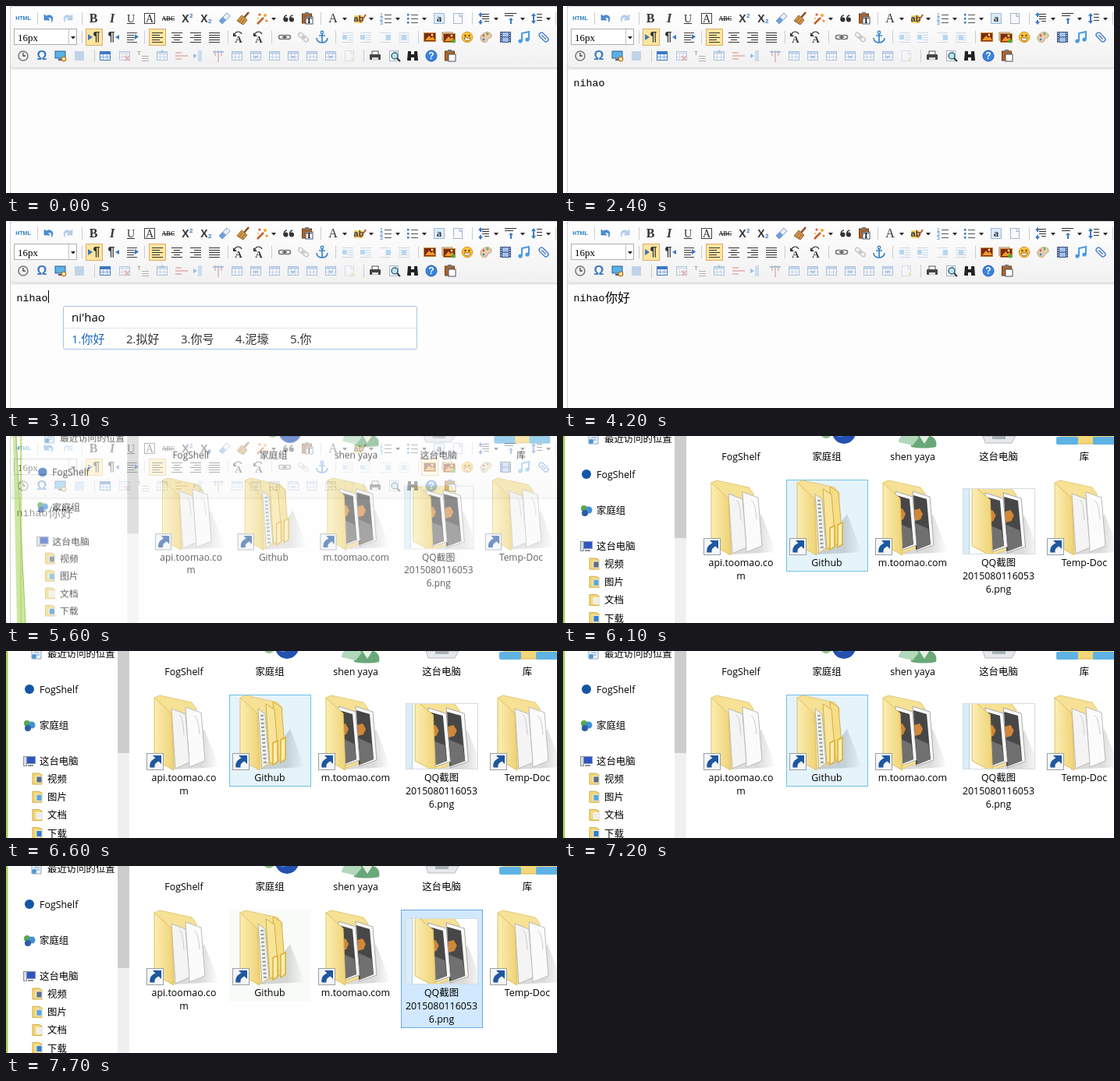
An HTML page for the animation above (8 s loop, 706 px wide and 240 px high).

```html
<!DOCTYPE html>
<html lang="zh">
<head>
<meta charset="utf-8">
<title>Editor and file picker</title>
<style>
html, body { margin: 0; width: 100%; height: 100%; overflow: hidden; background: #fff; }
svg { display: block; }
.serif { font-family: "Liberation Serif", serif; }
.sans { font-family: "Liberation Sans", sans-serif; }
.mono { font: 13.33px "Liberation Mono", "Noto Sans CJK SC", monospace; }
.han { font: 300 16px "Noto Sans CJK SC", "Noto Sans CJK", sans-serif; }
.label { font: 12.4px "Open Sans", "Noto Sans CJK SC", "Noto Sans CJK", sans-serif; }
#win { transform-origin: 0 0; }
</style>
</head>
<body>
<svg id="stage" width="706" height="240" viewBox="0 0 706 240" xmlns="http://www.w3.org/2000/svg"></svg>
<script>
const LOOP = 8000;
const rules = [];

// Hard-stepped keyframes from [ms, value] pairs
function track(id, prop, ...points) {
  const frames = points.map(([ms, v]) => `${ms / LOOP * 100}%{${prop}:${v}}`).join('');
  rules.push({ id, name: `${id}-${prop}`, frames });
}
function show(id, ...spans) {
  const points = [[0, 0]];
  for (const [on, off] of spans) {
    points.push([on, 1]);
    if (off) points.push([off, 0]);
  }
  track(id, 'opacity', ...points);
}

// Drawing helpers
const rect = (x, y, w, h, fill, more = '') => `<rect x="${x}" y="${y}" width="${w}" height="${h}" fill="${fill}" ${more}/>`;
const path = (d, fill, more = '') => `<path d="${d}" fill="${fill}" ${more}/>`;
const line = (d, color, w = 1, more = '') => path(d, 'none', `stroke="${color}" stroke-width="${w}" ${more}`);
const dot = (x, y, r, fill, more = '') => `<circle cx="${x}" cy="${y}" r="${r}" fill="${fill}" ${more}/>`;
const text = (x, y, s, cls, more = '') => `<text x="${x}" y="${y}" class="${cls}" ${more}>${s}</text>`;
const at = (x, y, art, opacity = 1) => `<g transform="translate(${x} ${y})" opacity="${opacity}">${art}</g>`;
const glyph = (s, size, more = '', cls = 'serif') => text(0, size * 0.34, s, cls, `font-size="${size}" text-anchor="middle" fill="#333" ${more}`);
const bars = (widths, align = 0, color = '#333', step = 3) => widths.map((w, i) =>
  rect(-7 + (14 - w) * align, -6 + i * step, w, 1, color)).join('');
const drop = (x, y) => path(`M${x - 3} ${y - 1}h6l-3 3.5z`, '#222');
const frame = (x, y, fill, stroke) => rect(x - 10.5, y - 10.5, 21, 21, fill, `stroke="${stroke}"`);

const BLUE = '#3d78c4';
const ink = '#333';

const list = mark => [-5, 0, 5].map((y, i) => mark(y, i) + rect(-2, y, 9, 1, '#555')).join('');
const page = rect(-5.5, -6.5, 11, 13, '#f7f9fd', 'stroke="#a9b4c8"') + path('M2 -6.5v4h4', '#dce4f2', 'stroke="#a9b4c8"');
const clipboard = rect(-6.5, -6, 12, 12, '#a9642c', 'stroke="#6d3d18"') + rect(-3, -8, 5, 3, '#777') + rect(-2, -2, 9, 9, '#fff', 'stroke="#456"');
const picture = rect(-7.5, -5.5, 15, 11, '#7a2b12', 'stroke="#c9863c"') + path('M-6 4L-1 -2L2 1L4 -1L7 4z', '#f39a2c') + dot(3, -3, 1.5, '#ffe08a');
const undo = path('M-6 -5v7h7l-2.5-2.5c3-2 6 0 5 5c4-6-1-11-7-7.5z', '#4b8fdb', 'stroke="#2a68b0" stroke-width=".6"');
const floated = (x, w) => bars([14, w, w, w, 14], 1, '#8fb4d8') + rect(x, -3, 6, 6, '#6aaee8');
const link = x => rect(x, -2.5, 8, 5, 'none', 'rx="2.5" stroke="#777" stroke-width="1.6"');
const chain = link(-7.5) + link(-.5) + line('M-3 0h6', '#555', 1.5);
const grid = head => rect(-6.5, -5.5, 13, 11, '#fff', `stroke="${BLUE}"`) + rect(-6, -5, 12, 3, head) +
  line('M-6 1.5h12M-2.5 -2v7M2.5 -2v7', '#86aadc');
const pilcrow = flip => glyph('¶', 16, `font-weight="bold" dx="${flip ? -3 : 3}"`, 'sans') +
  (flip ? path('M7 -3v6l-5-3z', BLUE) : path('M-8 -4v8l6-4z', BLUE));
const turn = s => glyph(s, 13, 'dy="3" font-weight="bold"') + line('M-5 -4c2-4 7-4 9 0', ink, 1.2) + path('M-7 -6v5h5z', ink);
const script = y => glyph('X', 14, 'font-weight="bold" dx="-2"', 'sans') + text(3, y, '2', 'sans', `font-size="8" font-weight="bold" fill="${BLUE}"`);

function toolbar() {
  const seps = [[16, 40, 97, 403, 597, 704], [40, 97, 177, 284, 340, 422, 528], [64, 113, 458]];
  let out = seps.map(([y, ...xs]) => xs.map(x => rect(x, y - 8, 1, 16, '#ccc')).join('')).join('');

  const row1 = [
    [22, glyph('HTML', 7, 'font-weight="bold" style="fill:#2b7fc3"', 'sans')],
    [55, undo], [79, `<g transform="scale(-1 1)">${undo}</g>`, .4],
    [112, glyph('B', 16, 'font-weight="bold"')],
    [136, glyph('I', 16, 'font-style="italic" font-weight="bold"')],
    [160, glyph('U', 14) + rect(-5, 6, 10, 1, ink)],
    [184, rect(-6.5, -6.5, 13, 13, '#fff', 'stroke="#444"') + glyph('A', 14)],
    [208, glyph('ABC', 8, 'font-weight="bold"') + rect(-8, 0, 16, 1, ink)],
    [232, script(-1)], [256, script(6)],
    [280, path('M-7 3L3 -7L7 -3L-3 7z', '#e9f0fa', 'stroke="#7f98bd"') + path('M-7 3L-2 -2L2 2L-3 7z', '#6f9fdc')],
    [304, line('M7 -8L1 -1', '#8a4b1c', 2.5) + path('M-2 -4L5 2L0 8L-8 3z', '#d59a4e', 'stroke="#8a5a24"') + line('M-5 4l4-5M-2 6l4-5', '#8a5a24')],
    [328, line('M-6 7L2 -1', '#c0602a', 2.5) + dot(4, -4, 2, '#f6a623') + dot(-3, -5, 1.6, '#e8542c') + dot(6, 3, 1.6, '#f08a24') + dot(-5, 0, 1, '#f6a623')],
    [362, dot(-3.5, 1.5, 3, ink) + dot(4, 1.5, 3, ink) + line('M-6 2c0-4 2-6 4-6M1.5 2c0-4 2-6 4-6', ink, 1.5)],
    [386, clipboard + text(-1, 6, 'T', 'serif', 'font-size="10" font-weight="bold"')],
    [419, glyph('A', 16)],
    [453, rect(-7, -4, 11, 10, '#f9d36a') + glyph('ab', 11, 'font-weight="bold" dx="-1"', 'sans') + line('M1 5L8 -5', '#b5562b', 2)],
    [487, list((y, i) => text(-8, y + 3, i + 1, 'sans', `font-size="7" fill="${BLUE}"`))],
    [521, list(y => rect(-7, y - 1, 2.5, 2.5, BLUE))],
    [555, rect(-6.5, -6.5, 13, 13, '#dcecfb', 'stroke="#6a9bd0" stroke-dasharray="2 1"') + glyph('a', 13, 'font-weight="bold"')],
    [579, page],
    [612, path('M-7 -4l3-4l3 4h-2v2h-2v-2zM-7 4l3 4l3-4h-2v-2h-2v2z', BLUE) + bars([9, 9, 9, 6], 1)],
    [647, rect(-8, -7, 15, 1, ink) + rect(-8, -4, 11, 1, ink) + path('M-3 2l3-3l3 3h-2v5h-2v-5z', BLUE)],
    [680, path('M-7 -3l3-4l3 4h-2v6h2l-3 4l-3-4h2v-6z', BLUE) + bars([7, 7, 7], 1, ink, 4)],
  ];
  const row2 = [
    [113, pilcrow(false)], [138, pilcrow(true)],
    [162, bars([13, 9, 13, 9, 13], 0, '#444') + path('M3 -4v7l5-3.5z', BLUE)],
    [194, bars([14, 10, 14, 10, 14])], [219, bars([14, 8, 14, 8, 14], .5)],
    [243, bars([14, 9, 14, 9, 14], 1)], [267, bars([14, 14, 14, 14, 14])],
    [298, turn('A')], [324, turn('A')],
    [357, chain], [381, `<g transform="rotate(40)">${chain}</g>`, .35],
    [405, dot(0, -6, 1.7, 'none', 'stroke="#3a84c8" stroke-width="1.4"') + line('M0 -4V7M-4 -2h8M-7 1c0 8 14 8 14 0', '#3a84c8', 1.7)],
    [438, floated(-7, 7), .45], [461, floated(-7, 7), .45], [486, floated(1, 7), .45], [510, floated(-3, 14), .45],
    [543, picture], [567, rect(-8, -6, 13, 10, '#fff', 'stroke="#a87b45"') + at(1, 1, picture) + dot(6, 5, 2.5, '#54ad3c')],
    [591, dot(0, 0, 6.8, '#fbc63b', 'stroke="#d98e20"') + dot(-2.5, -2, 1.2, '#653b10') + dot(2.5, -2, 1.2, '#653b10') + path('M-4 1h8c-1 5-7 5-8 0', '#fff', 'stroke="#7d4610" stroke-width=".8"')],
    [615, path('M-7 2C-8 -5 4 -10 7 -3C8 2 2 1 2 3C2 8 -6 8 -7 2z', '#e4cfae', 'stroke="#b59a74"') + dot(-3, -2, 1.4, '#d9534f') + dot(2, -4, 1.4, '#5aa65a') + dot(-3, 3, 1.4, '#4c7fc9')],
    [640, rect(-7, -7, 14, 14, '#394f7c') + rect(-4, -6, 8, 5.5, '#9fc0ef') + rect(-4, .5, 8, 5.5, '#9fc0ef') + line('M-5.5 -6v13M5.5 -6v13', '#fff', 1, 'stroke-dasharray="1.5"')],
    [664, line('M-3 5V-5L6 -7V3', '#4a9be0', 2) + dot(-5, 5, 2.6, '#4a9be0') + dot(4, 3, 2.6, '#4a9be0')],
    [689, `<g transform="rotate(-45)">${rect(-3, -7, 6, 14, 'none', 'rx="3" stroke="#4f82cf" stroke-width="1.5"')}${line('M0 -4V4', '#4f82cf', 1.5)}</g>`],
  ];
  const row3 = [
    [22, dot(0, 0, 6, '#eee', 'stroke="#777" stroke-width="1.5"') + line('M0 -4V0H3', '#444', 1.3)],
    [46, glyph('Ω', 16, `font-weight="bold" style="fill:${BLUE}"`, 'sans')],
    [70, rect(-7, -6, 13, 9, '#58b1e8', 'stroke="#33638f"') + rect(-3, 4, 5, 2, '#557') + dot(4, 4, 3, '#f2b53c', 'stroke="#a66d1c"') + line('M4 2v4M2 4h4', '#fff')],
    [94, rect(-6, -6, 12, 12, '#8fb4e0'), .5],
    [127, grid('#3d78c4')],
    [152, grid('#bcd') + line('M0 0l6 6M6 0L0 6', '#d44', 2), .35],
    [176, text(-8, -1, 'T', 'sans', 'font-size="8"') + bars([0, 0, 9, 9, 9], 1, '#666'), .45],
    [200, grid('#9bd') + path('M-3 -4l3-4l3 4z', BLUE), .4],
    [225, line('M-8 -4H0M-8 0H8M-8 4H0', '#d66', 2), .4],
    [248, rect(-2, -7, 5, 14, '#9cc2ec') + path('M-8 -3v6l5-3z', BLUE), .45],
    [272, line('M-4 -7V0M0 -7V8M4 -7V0', '#c77', 2) + line('M-7 -5H7', BLUE, 2), .4],
    ...[296, 320, 344, 368, 392, 416].map((x, i) => [x, rect(-7, -5, 14, 10, '#cfe0f5') + grid('#7ea9de') + (i % 2 ? path('M-3 0h6l-3 4z', BLUE) : ''), .4]),
    [440, page + dot(4, 4, 2, '#e8c65a'), .35],
    [473, rect(-4, -6, 8, 5, '#fff', 'stroke="#555"') + rect(-7, -2, 14, 7, '#444', 'rx="1"') + rect(-4, 2, 8, 4, '#ddd')],
    [497, page + dot(1, 0, 4, '#bfe3ee', 'stroke="#356c78" stroke-width="1.5"') + line('M4 3l4 4', '#333', 2)],
    [521, path('M-6 -6h4v4h4v-4h4l1 12h-5v-4h-4v4h-5z', '#222')],
    [545, dot(0, 0, 7, '#3a83e0', 'stroke="#215cae"') + glyph('?', 12, 'font-weight="bold" style="fill:#fff"', 'sans')],
    [569, clipboard],
  ];

  out += frame(113, 40, '#ffe69f', '#dcac6c') + frame(194, 40, '#ffe69f', '#dcac6c');
  out += [['hoverFace', 591], ['hoverMulti', 567], ['hoverOne', 543]]
    .map(([id, x]) => `<g id="${id}">${frame(x, 40, '#fff5d4', '#dcac6c')}</g>`).join('');
  [[16, row1], [40, row2], [64, row3]].forEach(([y, row]) => {
    out += row.map(([x, art, o]) => at(x, y, art, o)).join('');
  });
  out += [343, 434, 468, 502, 536, 628, 662, 695].map(x => drop(x, 16)).join('');
  out += rect(10.5, 29.5, 80, 20, '#fff', 'stroke="#b0b0b0"') + rect(80, 30, 1, 19, '#c4c4c4') + drop(86, 40) +
    text(15, 45, '16px', 'serif', 'font-size="13"');
  return out;
}

function popup() {
  const words = ['你好', '拟好', '你号', '泥壕', '你'];
  const box = (id, w) => `<g id="${id}">${rect(73.5, 109.5, w, 55, '#fff', 'rx="2" stroke="#a9c3dd"')}${rect(74, 137, w - 1, 1, '#dbe6f0')}</g>`;
  return `<g id="popup">${box('narrow', 361)}${box('wide', 453)}` +
    text(84, 129, "ni'hao", 'label', 'style="font-size:15px"') +
    words.map((s, i) => text(84 + i * 70, 157, `${i + 1}.${s}`, 'label', `style="font-size:15px" fill="${i ? '#333' : '#1c66c0'}"`)).join('') + '</g>';
}

function editor() {
  return rect(0, 0, 706, 240, '#fff') + rect(5.5, -4, 720, 260, '#fdfdfd', 'stroke="#d0d0d0"') +
    rect(5.5, .5, 720, 79, 'url(#bar)', 'rx="4" stroke="#d4d4d4"') + rect(6, 80, 700, 2, '#000', 'opacity=".06"') +
    toolbar() +
    [['ni', 14], ['h', 30], ['ao', 38]].map(([s, x]) => text(x - .5, 103, s, 'mono', `id="type-${s}"`)).join('') +
    text(54, 103.5, '你好', 'han', 'id="word"') +
    rect(0, 89, 1, 16, '#000', 'id="caret"') + popup();
}

// Open folder seen from the side: back, leaning sheets, front cover
const sheet = (x, top, w, fill, stroke) => path(`M${x} ${top}l${w} 7l5 62l${-w} 8z`, fill, `stroke="${stroke}"`);
const photo = x => sheet(x, 71, 22, '#fafafa', '#aaa') + path(`M${x + 1} 76l17 5l5 58l-19 7z`, '#474747') +
  path(`M${x + 4} 112l16 7l3 20l-17 7z`, '#707070') + path(`M${x + 2} 95l7-2l4 7l-3 7l-7 2z`, '#d08738');
const contents = {
  doc: sheet(54, 72, 20, '#fbfbfb', '#bbb') + sheet(36, 74, 18, '#f4f4f4', '#bbb') + line('M46 82c4 2 5 12 6 26M65 83c4 2 6 10 7 24', '#ccc'),
  photo: photo(52) + photo(30),
  dirs: sheet(56, 65, 11, '#f6dd86', '#d2ae4b') + sheet(47, 68, 11, '#f9e59a', '#d2ae4b') + sheet(37, 74, 9, '#f2f2e8', '#b5b5a5') +
    line('M42 82l4 62', '#8d9bab', 4, 'stroke-dasharray="2 3"') +
    path('M56 118l6-3v27l-6 4zM66 114l6-3v28l-6 4z', '#fbeeb4', 'stroke="#dcae33" stroke-width="1.5"'),
};
const folder = kind => path('M40 152L97 149L78 100z', 'url(#shade)') +
  path('M14 60L21 57L62 66L68 74L62 142L36 152z', '#f6e194', 'stroke="#e3c878"') + contents[kind] +
  path('M14 60L36 80L39 153L14 139z', 'url(#cover)', 'stroke="#dfc168"');
const shortcut = rect(4.5, 131.5, 21, 21, '#f4f6f8', 'stroke="#9aa0a6"') +
  path('M12 134h11v11l-3.500-3.500c-5 3-5 4-5 8h-6c-1-6 2-10 7-12z', '#1f579f');

function explorer() {
  const items = [
    [176, 'doc', ['api.toomao.co', 'm']],
    [286, 'dirs', ['Github']],
    [396, 'photo', ['m.toomao.com']],
    [506, null, ['QQ截图', '2015080116053', '6.png']],
    [616, 'doc', ['Temp-Doc']],
  ];
  const hover = (id, x, h, fill = '#e5f3fb', stroke = '#70c0e7') => rect(x + .5, 56.5, 104, h, fill, `stroke="${stroke}" id="${id}"`);
  const middle = (x, y, s) => text(x, y, s, 'label', 'text-anchor="middle"');
  const side = (x, y, s) => text(x, y, s, 'label');
  const thumb = rect(6.5, 67.5, 92, 84, '#fff', 'stroke="#d4dde4"') + rect(7, 68, 8, 83, '#dcedf7') + rect(14, 68, 1, 83, '#a9d4ea') +
    `<g clip-path="url(#thumb)"><g transform="translate(3.500 2) scale(1.050 1)">${folder('photo')}</g></g>`;

  let out = rect(0, 0, 760, 270, '#fff') + rect(0, 0, 2, 270, '#a4cf4c') + rect(2, 0, 1, 270, '#d6e9b0') +
    rect(143, 0, 15, 270, '#f0f0f0') + rect(143, 0, 15, 131, '#cdcdcd');

  // Navigation pane
  out += path('M33 -3h12v13h-12z', '#eef3f8', 'stroke="#8ba3b8"') + line('M36 2h7M36 5h7', '#6a9bc8') + dot(36, 7, 3, '#4d9ad8') + side(53, 8, '最近访问的位置');
  out += dot(30, 49, 6, '#1455a8') + side(43, 54, 'FogShelf');
  out += dot(27, 93, 4, '#58a84c') + dot(33, 95, 4.5, '#4390d2') + dot(28, 99, 4, '#2c5da6') + side(43, 100, '家庭组');
  out += rect(25.5, 135.5, 12, 9, '#2f55c4', 'stroke="#8998a8"') + rect(22.5, 135.5, 4, 12, '#d9dee4', 'stroke="#8a949e"') + rect(28, 146, 7, 2, '#8a949e') + side(43, 146, '这台电脑');
  [['视频', '#5a6e8a'], ['图片', '#5aa6d8'], ['文档', '#e9edf2'], ['下载', '#2f80d0']].forEach(([s, color], i) => {
    const y = 164 + i * 23.2;
    out += at(40, y, path('M-6 -7h8l4 2v12h-12z', '#f3d778', 'stroke="#cfaa4a"') + rect(-1, -3, 7, 8, color, 'stroke="#fff" stroke-width=".7"')) + side(53, y + 5, s);
  });

  // Bottom edges of the first row
  out += dot(337, -4, 7, '#8fc287') + dot(360, -5, 15, '#2450b0') + dot(355, -8, 9, '#6fa4e2');
  out += path('M446 14c-1-9 5-15 17-15s17 6 15 15c-10 2-22 2-32 0z', '#69a878') + path('M456 -1l7 11l7-11z', '#e6efe4') +
    path('M430 8c0-7 6-12 14-12l12 6l-8 10z', '#b2d8bc');
  out += path('M538 0h42l-5 9h-34z', '#e6e9eb', 'stroke="#b4bac0"') + rect(550, -2, 17, 6, '#a9b0b6');
  out += rect(638, -5, 66, 15, '#f4d778', 'rx="2" stroke="#d6b14e"') + rect(632, 1, 28, 10, '#5fb3e4', 'rx="2"') + rect(679, 1, 28, 10, '#5fb3e4', 'rx="2"');
  ['FogShelf', '家庭组', 'shen yaya', '这台电脑', '库'].forEach((s, i) => out += middle(228 + i * 110, 31, s));

  out += rect(286, 56, 105, 118, '#f8fbf7', 'id="trace"') + hover('overApi', 176, 134) + hover('overGit', 286, 117) +
    hover('overM', 396, 117) + hover('overShot', 506, 151) + hover('picked', 506, 151, '#d1e8ff', '#66a7e8');
  for (const [x, kind, names] of items) {
    out += at(x, 0, kind ? folder(kind) + shortcut : thumb);
    names.forEach((s, i) => out += middle(x + 52, 167 + i * 17, s));
  }
  return `<g id="win">${out}</g><g id="tilt">${path('M9 0L13 0L25 240H14z', '#b4dc74', 'fill-opacity=".65"')}${line('M13 0L25 240', '#9cc46a')}</g>`;
}

const defs = `<defs>
<linearGradient id="bar" x2="0" y2="1"><stop stop-color="#fff"/><stop offset="1" stop-color="#f1f1f1"/></linearGradient>
<linearGradient id="cover"><stop stop-color="#fbeeb2"/><stop offset="1" stop-color="#efd275"/></linearGradient>
<linearGradient id="shade"><stop offset=".6" stop-opacity=".14"/><stop offset="1" stop-opacity="0"/></linearGradient>
<clipPath id="thumb"><path d="M16 68h82v83h-82z"/></clipPath></defs>`;

document.getElementById('stage').innerHTML = defs + editor() + explorer();

// Typing
show('type-ni', [1300]);
show('type-h', [1500]);
show('type-ao', [1700]);
show('word', [3200]);
show('caret', [400, 1000], [1300, 2400], [2500, 4200], [4600, 5200]);
track('caret', 'transform', ...[[0, 14], [1300, 30], [1500, 38], [1700, 54], [3200, 86]].map(([ms, x]) => [ms, `translateX(${x}px)`]));
track('popup', 'opacity', [0, 0], [2500, .35], [2600, .7], [2700, 1], [3200, .6], [3300, .25], [3400, 0]);
show('narrow', [2400, 3100]);
show('wide', [3100, 3400]);

// Pointer over the toolbar
show('hoverFace', [4600, 5000]);
show('hoverMulti', [5000, 5100]);
show('hoverOne', [5100]);

// Window opening
track('win', 'opacity', [0, 0], [5600, .62], [5700, .9], [5800, 1]);
track('win', 'transform', [0, 'none'], [5600, 'translate(18px,-.9px) scale(.961,.963)'], [5700, 'translate(4px,0) scale(.991,.991)'], [5800, 'none']);
show('tilt', [5600, 5700]);

// Pointer over the files
show('overM', [6000, 6100], [6800, 7200]);
show('overGit', [6100, 6200], [6600, 6800], [7200, 7400]);
show('overApi', [6200, 6600]);
show('overShot', [7400, 7700]);
show('picked', [7700]);
show('trace', [7400]);

const byId = {};
for (const { id, name } of rules) (byId[id] ||= []).push(`${name} ${LOOP}ms step-end infinite`);
const style = document.createElement('style');
style.textContent = rules.map(r => `@keyframes ${r.name}{${r.frames}}`).join('\n') +
  Object.entries(byId).map(([id, list]) => `#${id}{animation:${list.join(',')}}`).join('\n');
document.head.append(style);
</script>
</body>
</html>
```
